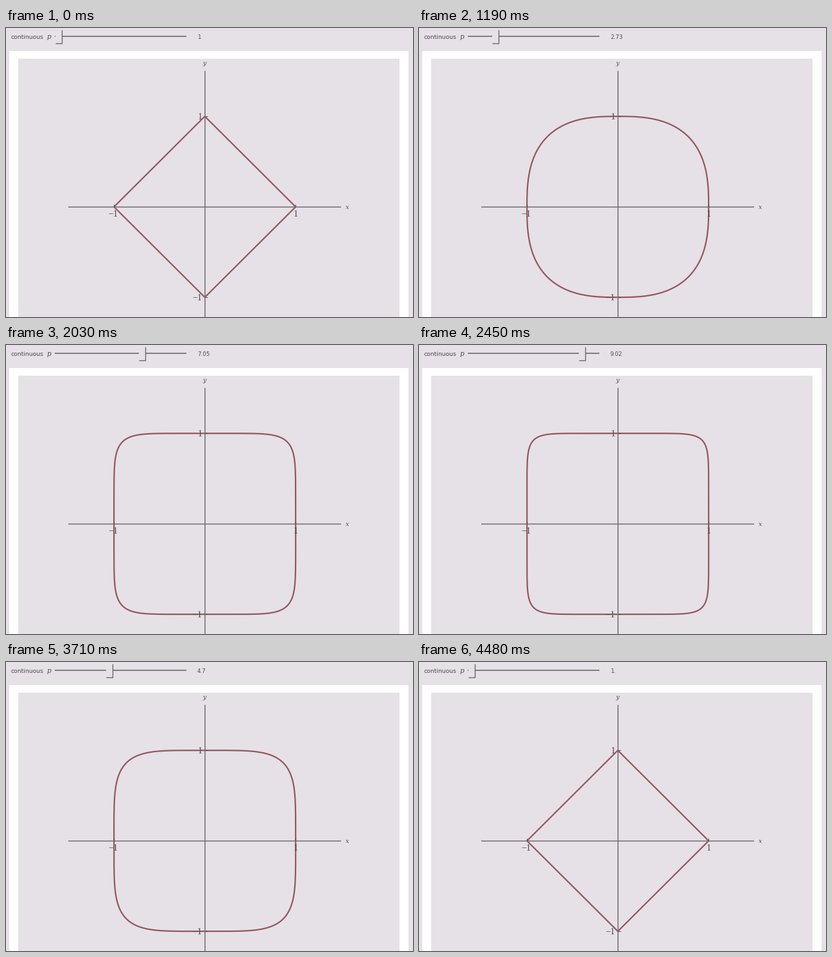
Animation, 634 px wide and 452 px high, one loop 4.62 s. Source, as a matplotlib script:

```python
import numpy as np
import matplotlib.pyplot as plt
from matplotlib.animation import FuncAnimation
from matplotlib.patches import Rectangle

W, H, DPI = 634, 452, 64        # a power of two keeps the pixel size exact
TICKS, INTERVAL = 66, 70
START = 13                      # tick at which the slider begins to move
FIRST, STEP = 1.158, 0.3929     # first moving value and change per update
CX, CY, UNIT = 309.7, 279.7, 141.5
BG, AXIS, INK, CURVE = "#e6e1e6", "#777277", "#4d484d", "#925560"
PX = 72 / DPI                   # points per pixel

fig = plt.figure(figsize=(W / DPI, H / DPI), dpi=DPI, facecolor=BG)
ax = fig.add_axes([0, 0, 1, 1])
ax.set(xlim=(0, W), ylim=(H, 0))
ax.axis("off")


def box(x, y, w, h, color, z=1):
    return ax.add_patch(Rectangle((x, y), w, h, fc=color, lw=0, zorder=z))


def line(xs, ys, color=AXIS, width=1.6, z=4):
    return ax.plot(xs, ys, color=color, lw=width * PX, zorder=z,
                   solid_capstyle="butt", solid_joinstyle="miter")[0]


def label(x, y, text, size, font="Liberation Serif", ha="center", style="normal"):
    return ax.text(x, y, text, fontsize=size * PX, family=font, style=style,
                   ha=ha, va="baseline", color=INK, zorder=5)


def p_at(tick):
    """Exponent at a tick: up to 10 and back, every tenth update is skipped."""
    if tick < START:
        return 1.0
    updates = tick - START - (tick - START + 1) // 10
    p = FIRST + STEP * updates
    return max(1.0, min(p, 20 - p))


def p_text(tick, p):
    if tick < START:
        return "1"
    return f"{p:.2f}".rstrip("0")


# panel
box(0, 0, W, H, BG, 0)
box(5, 36, 622, H - 36, "white")
box(19, 48, 594, H - 48, BG)
line([633.5, 633.5], [32, H], "#aaa6aa", 1)

# plot axes
line([97, 521.5], [CY, CY])
line([CX, CX], [67, H])
for side in (-1, 1):
    line([CX + side * UNIT] * 2, [CY - 4, CY], INK, 1)
    line([CX, CX + 4], [CY - side * UNIT] * 2, INK, 1)
label(451, 295, "1", 14)
label(174, 295, "\u22121", 14, ha="right")
label(302, 143, "1", 14)
label(305.5, 426, "\u22121", 14, ha="right")
label(309, 58, "y", 9.5, "DejaVu Serif", style="italic")
label(532, 283, "x", 9.5, "DejaVu Serif", style="italic")

# slider
label(7.5, 17, "continuous", 9.2, "DejaVu Sans", "left")
label(66.5, 17, "p", 10.5, "DejaVu Serif", style="italic")
line([76, 280.5], [12.8, 12.8], "#6f6b6f", 1.7, 2)
thumb = box(0, 3, 10, 21, BG, 3)
thumb_edge = line([], [], "#6a656a", 1.4)
value = label(298, 17, "", 8.7, "DejaVu Sans", "left")

curve = line([], [], CURVE, 2.2, 3)
theta = np.linspace(0, 2 * np.pi, 1601)
cos, sin = np.cos(theta), np.sin(theta)


def update(tick):
    p = p_at(tick)
    x = np.sign(cos) * np.abs(cos) ** (2 / p)
    y = np.sign(sin) * np.abs(sin) ** (2 / p)
    curve.set_data(CX + UNIT * x, CY - UNIT * y)
    knob = 86.5 + 21.57 * (p - 1)
    thumb.set_x(knob - 10)
    thumb_edge.set_data([knob, knob, knob - 10], [3, 24, 24])
    value.set_text(p_text(tick, p))
    return curve, thumb, thumb_edge, value


animation = FuncAnimation(fig, update, frames=TICKS, interval=INTERVAL,
                          repeat=True, repeat_delay=0)
plt.show()
```
